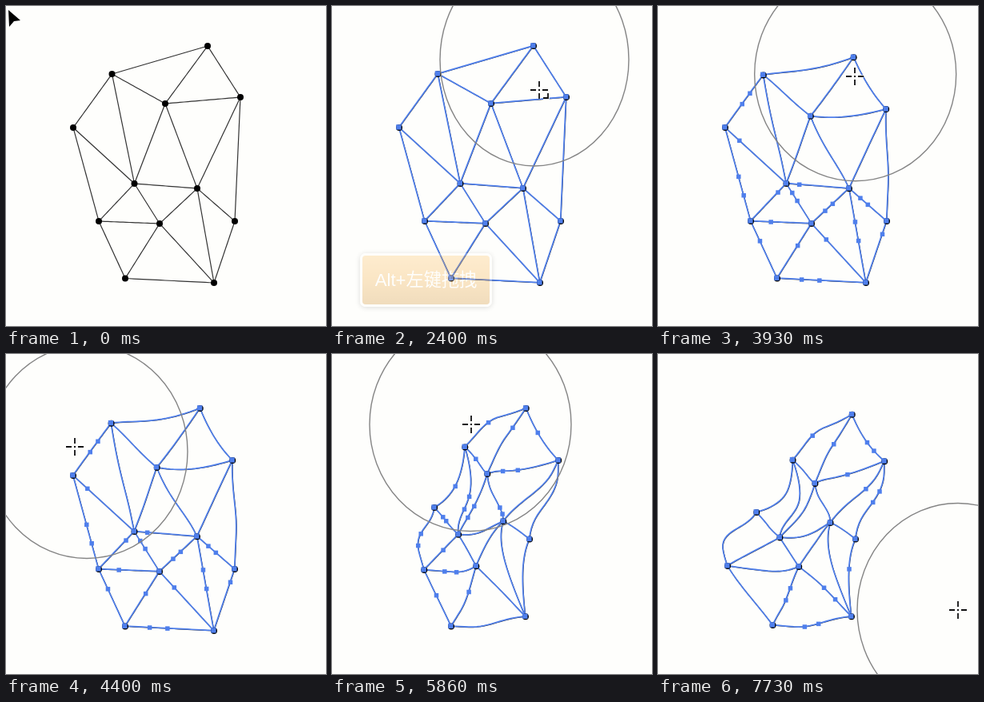
Recreate the animation shown at these times as an HTML page with a canvas. Size 400 by 400 pixels, loop 8130 ms.

```html
<!DOCTYPE html>
<html lang="zh">
<head>
<meta charset="utf-8">
<title>Mesh warp</title>
<style>
  html, body { margin: 0; width: 100%; height: 100%; overflow: hidden; background: #fefefc; }
  #stage { position: relative; width: 400px; height: 400px; overflow: hidden; }
  canvas { display: block; }
  .label {
    position: absolute; box-sizing: border-box; opacity: 0;
    border: 3px solid #fff; border-radius: 7px;
    background: linear-gradient(#fdb748, #f3a123 45%, #c87800);
    box-shadow: 0 1px 6px rgba(0, 0, 0, .55);
    color: #fff; text-align: center; white-space: nowrap;
    font-family: "Liberation Sans", "Noto Sans CJK SC", "Noto Sans CJK", sans-serif;
  }
  #tool { left: 23px; top: 305px; width: 128px; height: 74px; font-size: 28.8px; line-height: 72px; }
  #drag { left: 35px; top: 309px; width: 165px; height: 67px; font-size: 22.2px; line-height: 62px; }
</style>
</head>
<body>
<div id="stage">
  <canvas id="view" width="400" height="400"></canvas>
  <div class="label" id="tool">Shift+R</div>
  <div class="label" id="drag">Alt+左键拖拽</div>
</div>
<script>
const LOOP = 8130, FPS = 15, LEAD = 30, REACH = 130, SEGMENTS = 20;
const BLUE = '#4f7fec', PAPER = '#fefefc';
const ctx = document.getElementById('view').getContext('2d');
const toolLabel = document.getElementById('tool');
const dragLabel = document.getElementById('drag');

const nodes = {
  A: [252, 50], B: [132.5, 85], C: [199, 122], D: [293, 114], E: [84, 152], F: [160.5, 222],
  G: [239, 228], H: [116, 269], I: [192, 272], J: [286, 269], K: [149, 340.5], L: [260, 346]
};
const edges = ('AB AC AD BC BE BF CD CF CG DG DJ EF EH FG FH FI ' +
  'GI GJ GL HI HK IK IL JL KL').split(' ');

// Each stroke drags the area around (x, y) by (dx, dy), fading out at REACH
const strokes = [
  { from: 3660, to: 4000, x: 243, y: 104, dx: -13.7, dy: 26.6 },
  { from: 4600, to: 4900, x: 88, y: 120, dx: 52, dy: 43 },
  { from: 4900, to: 5100, x: 190, y: 215, dx: -3, dy: 4 },
  { from: 5100, to: 5330, x: 282, y: 276, dx: -39, dy: -38 },
  { from: 5930, to: 6200, x: 180, y: 92, dx: 0, dy: 14.5 },
  { from: 6400, to: 6800, x: 80, y: 266, dx: -36, dy: -10 },
  { from: 6860, to: 7000, x: 120, y: 195, dx: 6, dy: 8 }
];

// Key points: time, x, y
const brushPath = [
  [1000, 353, 385], [1330, 336, 215], [1460, 331, 185], [1600, 310, 130], [1730, 253, 67],
  [3600, 253, 67], [4000, 244, 92], [4200, 195, 140], [4400, 101, 122], [4500, 62, 104],
  [4900, 108, 150], [5100, 300, 300], [5330, 200, 267], [5700, 170, 97], [5860, 173, 88],
  [6130, 180, 105], [6400, 215, 250], [6700, 185, 235], [6800, 143.5, 204.5], [6860, 113, 194],
  [7000, 125, 205], [7070, 125, 205], [7200, 370, 319], [7570, 370, 319], [7730, 375, 320]
];
const brushSize = [[2400, 118, 133], [2800, 104, 55], [3260, 118, 113], [3400, 126, 133.5]];
const marqueePath = [[0, 3, 5], [460, 352, 386]];

const clamp = v => Math.max(0, Math.min(1, v));
const ramp = (t, a, b) => clamp((t - a) / (b - a));
const lerp = (p, q, k) => [p[0] + (q[0] - p[0]) * k, p[1] + (q[1] - p[1]) * k];
const random = seed => {
  const v = Math.sin(seed * 12.9898) * 43758.5453;
  return v - Math.floor(v);
};

// Smooth interpolation through key points that never overshoots
function track(keys, t) {
  const last = keys.length - 1;
  if (t <= keys[0][0]) return keys[0].slice(1);
  if (t >= keys[last][0]) return keys[last].slice(1);
  const i = keys.findIndex(k => k[0] > t) - 1;
  const h = keys[i + 1][0] - keys[i][0], u = (t - keys[i][0]) / h;
  const secant = (j, c) => j < 0 || j >= last ? 0
    : (keys[j + 1][c] - keys[j][c]) / (keys[j + 1][0] - keys[j][0]);
  const slope = (j, c) => {
    const a = secant(j - 1, c), b = secant(j, c);
    return a * b > 0 ? 2 * a * b / (a + b) : 0;
  };
  return [1, 2].map(c => {
    const p = keys[i][c], q = keys[i + 1][c], s = u * u * (3 - 2 * u);
    return p + (q - p) * s +
      h * u * (1 - u) * (slope(i, c) * (1 - u) - slope(i + 1, c) * u);
  });
}

function warp([x, y], t) {
  for (const s of strokes) {
    const near = 1 - ((x - s.x) ** 2 + (y - s.y) ** 2) / REACH ** 2;
    const k = Math.max(0, near) ** 2 * ramp(t, s.from, s.to);
    x += s.dx * k;
    y += s.dy * k;
  }
  return [x, y];
}

const onEdge = (e, k, t) => warp(lerp(nodes[e[0]], nodes[e[1]], k), t);

function strokePath(color, width) {
  ctx.strokeStyle = color;
  ctx.lineWidth = width;
  ctx.stroke();
}

function square([x, y], size) {
  ctx.fillRect(x - size / 2, y - size / 2, size, size);
}

function traceEdges(t, shift) {
  ctx.beginPath();
  for (const e of edges) {
    for (let i = 0; i <= SEGMENTS; i++) {
      const [x, y] = onEdge(e, i / SEGMENTS, t);
      ctx[i ? 'lineTo' : 'moveTo'](x - shift, y - shift);
    }
  }
}

// Edges outside the latest stroke carry one or two extra anchors
function drawAnchors(t) {
  const n = strokes.filter(s => t >= s.from).length;
  if (!n) return;
  const { x, y } = strokes[n - 1];
  edges.forEach((e, i) => {
    const [mx, my] = onEdge(e, .5, t);
    if (Math.hypot(mx - x, my - y) < 115) return;
    const seed = n * 50 + i, k = .2 + .4 * random(seed);
    square(onEdge(e, k, t), 5.5);
    if (random(seed + .5) > .5) square(onEdge(e, k + .2, t), 5.5);
  });
}

function drawMesh(t) {
  const selected = t >= 595;
  traceEdges(t, 0);
  strokePath('#333', 1.2);
  if (selected) {
    traceEdges(t, .4);
    strokePath(BLUE, 1.7);
  }
  for (const n in nodes) {
    const [x, y] = warp(nodes[n], t);
    ctx.fillStyle = '#000';
    ctx.beginPath();
    ctx.arc(x, y, 4, 0, 7);
    ctx.fill();
    ctx.fillStyle = BLUE;
    if (selected) square([x - .6, y - .6], 6.4);
  }
  drawAnchors(t);
}

function drawArrow([x, y]) {
  ctx.beginPath();
  [[0, 0], [15, 13], [7, 14], [1, 21]].forEach(([dx, dy]) => ctx.lineTo(x + dx, y + dy));
  ctx.closePath();
  ctx.fillStyle = '#000';
  ctx.fill();
}

function drawCross([x, y], resizing) {
  x = Math.round(x);
  y = Math.round(y);
  ctx.beginPath();
  for (const [dx, dy] of [[1, 0], [-1, 0], [0, 1], [0, -1]]) {
    ctx.moveTo(x + dx * 4, y + dy * 4);
    ctx.lineTo(x + dx * 11, y + dy * 11);
  }
  if (resizing) {
    ctx.moveTo(x + 11, y + 4);
    ctx.lineTo(x + 11, y + 10);
    ctx.lineTo(x + 5, y + 10);
  }
  strokePath('#fff', 3.5);
  strokePath('#111', 1.8);
  ctx.fillStyle = '#111';
  square([x, y], 2);
}

function drawMarquee([x, y]) {
  ctx.beginPath();
  ctx.rect(3.5, 5.5, Math.round(x - 3), Math.round(y - 5));
  ctx.setLineDash([2, 1]);
  strokePath('#777', 1);
  ctx.setLineDash([]);
}

function drawPointer(t) {
  if (t < 995) {
    const tip = track(marqueePath, t);
    if (t > 50 && t < 595) drawMarquee(tip);
    drawArrow(tip);
    return;
  }
  const [cx, cy] = track(brushPath, t), [rx, ry] = track(brushSize, t);
  if (t >= 1195) {
    ctx.beginPath();
    ctx.ellipse(cx, cy, rx, ry, 0, 0, 7);
    strokePath('#858585', 1.4);
  }
  // While resizing, the cursor sits as far out as the brush has grown
  const resizing = t >= 2395 && t < 3655;
  drawCross(resizing ? [cx + rx - 112, cy + ry - 95] : track(brushPath, t + LEAD), resizing);
}

function draw(t) {
  ctx.fillStyle = PAPER;
  ctx.fillRect(0, 0, 400, 400);
  drawMesh(t);
  drawPointer(t);
  toolLabel.style.opacity = ramp(t, 735, 1000) - ramp(t, 1935, 2130);
  dragLabel.style.opacity = ramp(t, 2335, 2600) - ramp(t, 3600, 3860);
}

const start = performance.now();
function tick() {
  const t = (performance.now() - start) % LOOP;
  const step = Math.floor((t + 6.7) * FPS / 1000);
  draw(Math.floor(step * 100 / FPS) * 10);
  requestAnimationFrame(tick);
}
tick();
</script>
</body>
</html>
```
